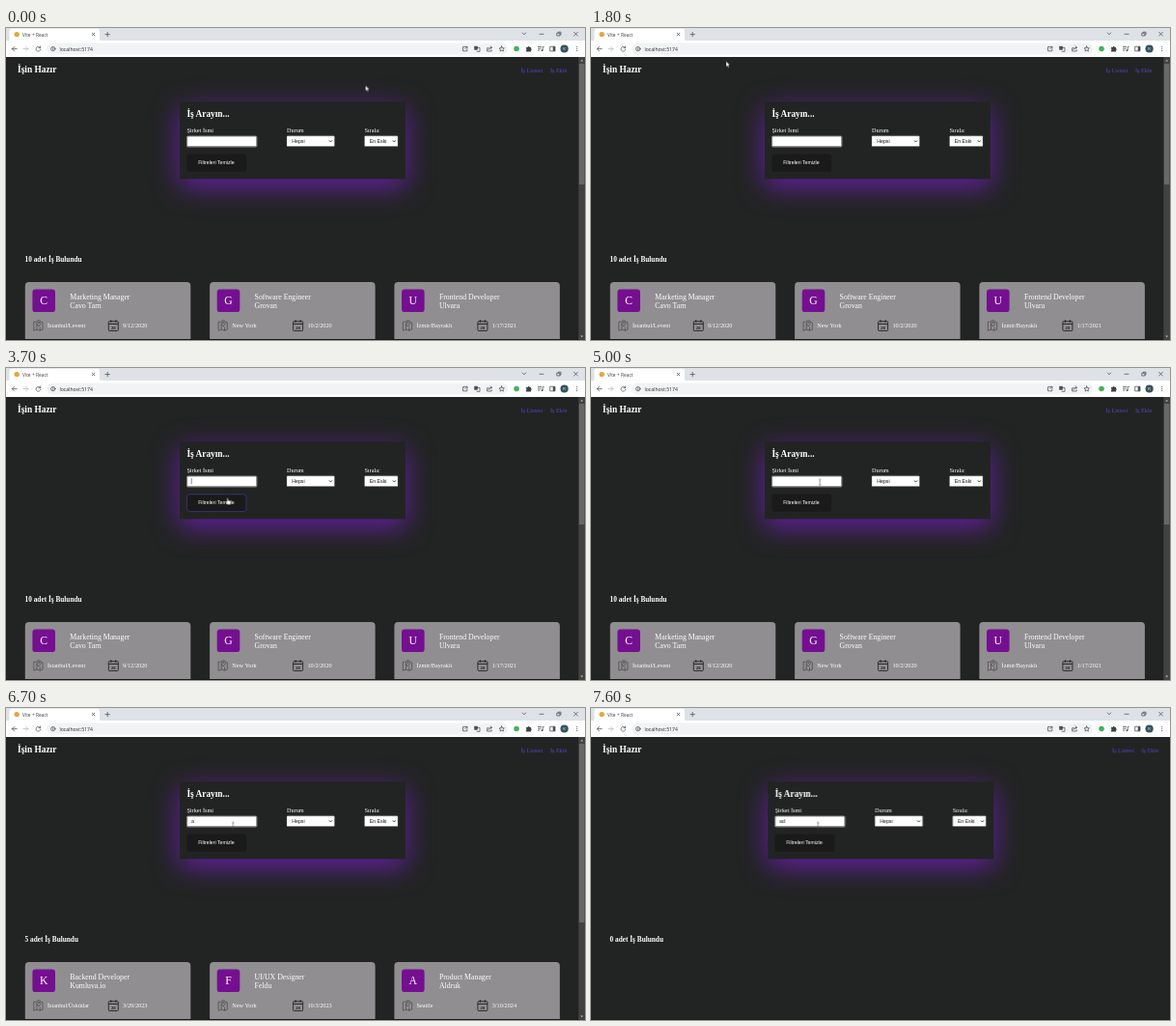
Write an HTML page that moves like this. It is 600 px wide and 323 px high and loops after 8 s.

```html
<!DOCTYPE html>
<html lang="tr">
<head>
<meta charset="utf-8">
<title>Job list</title>
<style>
html, body { margin: 0; width: 100%; height: 100%; overflow: hidden; background: #222423; }
svg { display: block; width: 600px; height: 323px; }
text { white-space: pre; }
.serif { font-family: "Liberation Serif", "Times New Roman", serif; font-size: 6.25px; fill: #fff; }
.ui { font-family: "Open Sans", "Noto Sans", sans-serif; fill: #3c4043; }
.control { font-family: "Liberation Sans", Arial, sans-serif; font-size: 5.2px; fill: #111; }
.h2 { font-size: 9.375px; font-weight: bold; }
.h3 { font-size: 7.31px; font-weight: bold; }
.role { font-size: 7.81px; }
.initial { font-size: 11.7px; text-anchor: middle; }
.link { fill: #5a42c6; }
.line { fill: none; stroke: #4b4f54; stroke-width: .75; stroke-linecap: round; stroke-linejoin: round; }
.pin { fill: none; stroke: #2c2b2c; stroke-width: .5; }
.panel { filter: drop-shadow(0 8px 14px #651fa3); }

/* 1% of the loop is 80 ms */
.links, .form, .all, .some, .none, .thumb, .bar, .typed-a, .typed-ad,
.caret, .caret-x, .arrow, .hand, .beam { animation: 8s step-end infinite; }
.links { animation-name: shift-links; }
.form { animation-name: shift-form; }
.all { animation-name: first; }
.some, .typed-a { animation-name: second; }
.none, .typed-ad { animation-name: third; }
.bar { animation-name: before-third; }
.thumb { animation-name: grow; }
.caret { animation-name: blink; }
.caret-x { animation-name: caret-x; }
.arrow { animation-name: arrow; }
.hand { animation-name: hand; }
.beam { animation-name: beam; }
.cursor { animation: travel 8s linear infinite; }
.hover { animation: hover 8s linear infinite; }

@keyframes shift-links { 0% { transform: none } 88.7%, 100% { transform: translateX(6.5px) } }
@keyframes shift-form { 0% { transform: none } 88.7%, 100% { transform: translateX(3.25px) } }
@keyframes first { 0% { opacity: 1 } 64.95%, 100% { opacity: 0 } }
@keyframes second { 0% { opacity: 0 } 64.95% { opacity: 1 } 88.7%, 100% { opacity: 0 } }
@keyframes third { 0% { opacity: 0 } 88.7%, 100% { opacity: 1 } }
@keyframes before-third { 0% { opacity: 1 } 88.7%, 100% { opacity: 0 } }
@keyframes grow { 0% { height: 125px } 64.95%, 100% { height: 185px } }
@keyframes caret-x {
  0% { transform: none }
  64.95% { transform: translateX(2.9px) }
  88.7%, 100% { transform: translateX(5.8px) }
}
@keyframes blink {
  0% { opacity: 0 } 3.7% { opacity: 1 } 9.9% { opacity: 0 }
  16.2% { opacity: 1 } 22.4% { opacity: 0 }
  28.7% { opacity: 1 } 34.9% { opacity: 0 }
  41.2% { opacity: 1 } 47.4% { opacity: 0 }
  53.7% { opacity: 1 } 58.7% { opacity: 0 }
  64.95% { opacity: 1 } 71.2% { opacity: 0 }
  77.4% { opacity: 1 } 83.7% { opacity: 0 }
  88.7% { opacity: 1 } 94.9%, 100% { opacity: 0 }
}
@keyframes arrow { 0% { opacity: 1 } 45% { opacity: 0 } 51.2% { opacity: 1 } 54.9%, 100% { opacity: 0 } }
@keyframes hand { 0% { opacity: 0 } 45% { opacity: 1 } 51.2%, 100% { opacity: 0 } }
@keyframes beam { 0% { opacity: 0 } 54.9%, 100% { opacity: 1 } }
@keyframes hover { 0%, 44% { opacity: 0 } 46.2%, 50% { opacity: 1 } 51.2%, 100% { opacity: 0 } }
@keyframes travel {
  0% { transform: translate(372.5px, 59.5px) }
  12.5%, 13.75% { transform: translate(378px, 61px); animation-timing-function: ease-in-out }
  22.5% { transform: translate(140px, 34.5px) }
  25% { transform: translate(132px, 24px) }
  26.25%, 27.5% { transform: translate(131px, 21px); animation-timing-function: ease-in-out }
  37.5% { transform: translate(357.3px, 233px) }
  38.75% { transform: translate(379px, 254px); animation-timing-function: ease-out }
  46.25% { transform: translate(229.5px, 134.5px) }
  50% { transform: translate(243px, 136px) }
  51.25%, 52.5% { transform: translate(255px, 127px) }
  58.75% { transform: translate(238px, 118px) }
  62.5%, 70% { transform: translate(237.2px, 118.3px) }
  75%, 100% { transform: translate(235.3px, 121.5px) }
}
</style>
</head>
<body>
<svg viewBox="0 0 600 323" xmlns="http://www.w3.org/2000/svg">
  <defs>
    <path id="chevron" d="M-1.5 -.8 0 .8 1.5 -.8" fill="none" stroke="#111" stroke-width=".8"/>
    <g id="map" class="pin">
      <path d="M2.5 2H.4V11L3.5 10 6.8 11 9.6 10V2.6L8.4 2M3.5 4V10M6.8 7.5V11"/>
      <path d="M5.5 6.8C3.9 4.8 3.3 3.6 3.3 2.6A2.2 2.2 0 0 1 7.7 2.6C7.7 3.6 7.1 4.8 5.5 6.8Z"/>
      <circle cx="5.5" cy="2.6" r=".7"/>
    </g>
    <g id="calendar">
      <rect x=".5" y="1.7" width="10" height="9.8" rx=".8" fill="none" stroke="#242324" stroke-width=".9"/>
      <path d="M.5 4.4H10.5" stroke="#242324" stroke-width="1"/>
      <path d="M3 .3V2.8M8 .3V2.8" stroke="#242324" stroke-width="1.1"/>
      <text x="5.5" y="9.5" text-anchor="middle" font-family="Liberation Sans, sans-serif" font-weight="bold" font-size="4.2" fill="#242324">28</text>
    </g>
  </defs>

  <rect width="600" height="323" fill="#222423"/>

  <!-- browser window -->
  <rect width="600" height="14" fill="#dee1e6"/>
  <path d="M1 13.5Q3.5 13.5 3.5 11V3Q3.5 .8 6 .8H94.5Q97 .8 97 3V11Q97 13.5 99.5 13.5Z" fill="#fff"/>
  <rect y="13" width="600" height="17" fill="#fff"/>
  <circle cx="11.2" cy="6.6" r="2.7" fill="#e5a63c"/>
  <text class="ui" x="17" y="8.5" font-size="4.9">Vite + React</text>
  <g class="line">
    <path d="M89.2 5.2 91.8 7.8M91.8 5.2 89.2 7.8M103 6.6H107.4M105.2 4.4V8.8"/>
    <path d="M535.3 5 537 6.8 538.7 5M553 6.3H557M571.2 5.2H574V8H571.2ZM572.2 5.2V4.2H575V7H574M588.6 4.3 592.4 8.1M592.4 4.3 588.6 8.1"/>
    <path d="M11.2 21.6H6.4M8.5 19.4 6.3 21.6 8.5 23.8"/>
    <path stroke="#b4b7bb" d="M18 21.6H22.8M20.7 19.4 22.9 21.6 20.7 23.8"/>
    <path d="M35.3 20.2A2.4 2.4 0 1 0 35.8 22.2M35.7 18.9V20.6H34"/>
  </g>
  <rect x="42" y="15.6" width="478" height="12" rx="6" fill="#f1f3f4"/>
  <g class="line">
    <circle cx="48.8" cy="21.6" r="2.2"/>
    <path d="M48.8 21.4V22.7M48.8 20.4V20.4"/>
    <path d="M475.5 19.5H473.5V23.8H477.8V22M476.3 19.3H478V21M477.8 19.5 475.5 21.8"/>
    <path d="M500.2 20.7H498.6V24H503.2V22.8M499.9 22.5Q500.3 20.3 503.3 20.2M502 18.9 503.6 20.2 502 21.6"/>
    <path d="M513.7 18.9 514.5 20.7 516.4 20.9 515 22.2 515.4 24.1 513.7 23.1 512 24.1 512.4 22.2 511 20.9 512.9 20.7Z"/>
    <path d="M551.4 19.5H554.6M551.4 21.3H554.2M551.4 23.1H553M556.2 23V19.3H557.4"/>
    <path d="M564.1 19.2H569V23.9H564.1Z"/>
  </g>
  <rect x="485.2" y="18.8" width="3.6" height="4" rx=".5" fill="#4b4f54"/>
  <path d="M488.2 20.4H491V24.3H488" class="line"/>
  <circle cx="529" cy="21.5" r="2.8" fill="#43b05c"/>
  <path d="M539 20H540.5A1.1 1.1 0 0 1 542.7 20H544V21.3A1 1 0 0 1 544 23.2V24.4H539V22.9A.9 .9 0 0 0 539 21.3Z" fill="#3f4347"/>
  <circle cx="555.5" cy="23.2" r=".9" fill="#4b4f54"/>
  <rect x="566.7" y="19.2" width="2.3" height="4.7" fill="#4b4f54"/>
  <circle cx="578.6" cy="21.5" r="4.1" fill="#35525f"/>
  <text x="578.6" y="23" text-anchor="middle" class="ui" font-size="4" style="fill:#fff">R</text>
  <g fill="#4b4f54">
    <circle cx="591.7" cy="19.6" r=".55"/><circle cx="591.7" cy="21.5" r=".55"/><circle cx="591.7" cy="23.4" r=".55"/>
  </g>
  <text class="ui" x="55.5" y="23.5" font-size="5.1" style="fill:#25282b">localhost:5174</text>

  <!-- page -->
  <g class="serif">
    <text class="h2" x="12" y="46.4">İşin Hazır</text>
    <g class="links">
      <text class="link" x="533.4" y="45.8">İş Listesi</text>
      <text class="link" x="563.9" y="45.8">İş Ekle</text>
    </g>
  </g>
  <g class="form">
    <rect class="panel" x="180" y="76.3" width="234" height="80" fill="#222423"/>
    <g class="serif">
      <text class="h2" x="187.4" y="92.4">İş Arayın...</text>
      <text x="187.4" y="108.4">Şirket İsmi</text>
      <text x="291" y="108.4">Durum</text>
      <text x="371.4" y="108.4">Sırala:</text>
    </g>
    <rect x="187.6" y="112" width="72.2" height="10.8" rx="1" fill="#fff" stroke="#858585" stroke-width="1.2"/>
    <rect x="291" y="111.8" width="49.4" height="10.7" rx=".6" fill="#fff" stroke="#767676" stroke-width=".4"/>
    <rect x="371.6" y="111.8" width="34.4" height="10.7" rx=".6" fill="#fff" stroke="#767676" stroke-width=".4"/>
    <use href="#chevron" x="336.5" y="117.2"/>
    <use href="#chevron" x="402.3" y="117.2"/>
    <g class="control">
      <text x="296.3" y="119">Hepsi</text>
      <text x="376.8" y="119">En Eski</text>
      <text class="typed-a" x="192" y="119">a</text>
      <text class="typed-ad" x="192" y="119">ad</text>
    </g>
    <g class="caret-x"><path class="caret" d="M192.2 114V120.4" stroke="#111" stroke-width=".5"/></g>
    <rect x="187.4" y="130.6" width="61.8" height="18.2" rx="3.1" fill="#1a1a1a"/>
    <rect class="hover" x="187.6" y="130.8" width="61.4" height="17.8" rx="3" fill="none" stroke="#4a3fb0" stroke-width=".6"/>
    <text class="control" x="199.2" y="141.3" style="fill:#fff">Filtreleri Temizle</text>
  </g>
  <g class="serif all" id="all"></g>
  <g class="serif some" id="some"></g>
  <g class="serif none" id="none"></g>
  <rect y="322" width="600" height="1" fill="#181918"/>

  <g class="bar">
    <rect x="593.3" y="30" width="6.7" height="293" fill="#424242"/>
    <rect class="thumb" x="593.9" y="37" width="5.5" height="125" fill="#686868"/>
    <path d="M595.2 34.6 596.7 32.8 598.2 34.6ZM595.2 318.6 596.7 320.4 598.2 318.6Z" fill="#b0b0b0"/>
  </g>

  <g class="cursor">
    <path class="arrow" d="M0 0V5.6L1.3 4.5 2.2 6.4 3.1 6 2.3 4.1H4Z" fill="#fff" stroke="#111" stroke-width=".35"/>
    <path class="hand" d="M-.6 .6Q0 -.5 .6 .6V2.4L3 3Q3.9 3.4 3.6 4.6L3.1 6.8H-.2L-2 4.2Q-1.7 3.2 -.6 4Z" fill="#fff" stroke="#111" stroke-width=".35"/>
    <path class="beam" d="M-1.1 -3.2Q0 -3.2 0 -2.5 0 -3.2 1.1 -3.2M0 -2.6V2.6M-1.1 3.2Q0 3.2 0 2.5 0 3.2 1.1 3.2" fill="none" stroke="#4a4a4a" stroke-width=".6"/>
  </g>
</svg>
<script>
const card = ([role, company, place, date], i) => `
  <g transform="translate(${19.8 + i * 191.3} 263)">
    <rect width="171.5" height="70" rx="4" fill="#908e90"/>
    <rect x="7.6" y="7.5" width="23.6" height="23.6" rx="3.2" fill="#750f91"/>
    <text class="initial" x="19.4" y="23.3">${company[0]}</text>
    <text class="role" x="46.5" y="18">${role}</text>
    <text class="role" x="46.5" y="26.7">${company}</text>
    <use href="#map" x="8.6" y="39.2"/>
    <text x="23.2" y="47.2">${place}</text>
    <use href="#calendar" x="86" y="39"/>
    <text x="101.3" y="47.2">${date}</text>
  </g>`;

function showList(id, count, jobs) {
  document.getElementById(id).innerHTML =
    `<text class="h3" x="19.6" y="241.6">${count} adet İş Bulundu</text>` + jobs.map(card).join("");
}

showList("all", 10, [
  ["Marketing Manager", "Cavo Tarn", "İstanbul/Levent", "9/12/2020"],
  ["Software Engineer", "Grovan", "New York", "10/2/2020"],
  ["Frontend Developer", "Ulvara", "İzmir/Bayraklı", "1/17/2021"],
]);
showList("some", 5, [
  ["Backend Developer", "Kumluva.io", "İstanbul/Üsküdar", "3/29/2023"],
  ["UI/UX Designer", "Feldu", "New York", "10/3/2023"],
  ["Product Manager", "Aldruk", "Seattle", "3/10/2024"],
]);
showList("none", 0, []);
</script>
</body>
</html>
```
